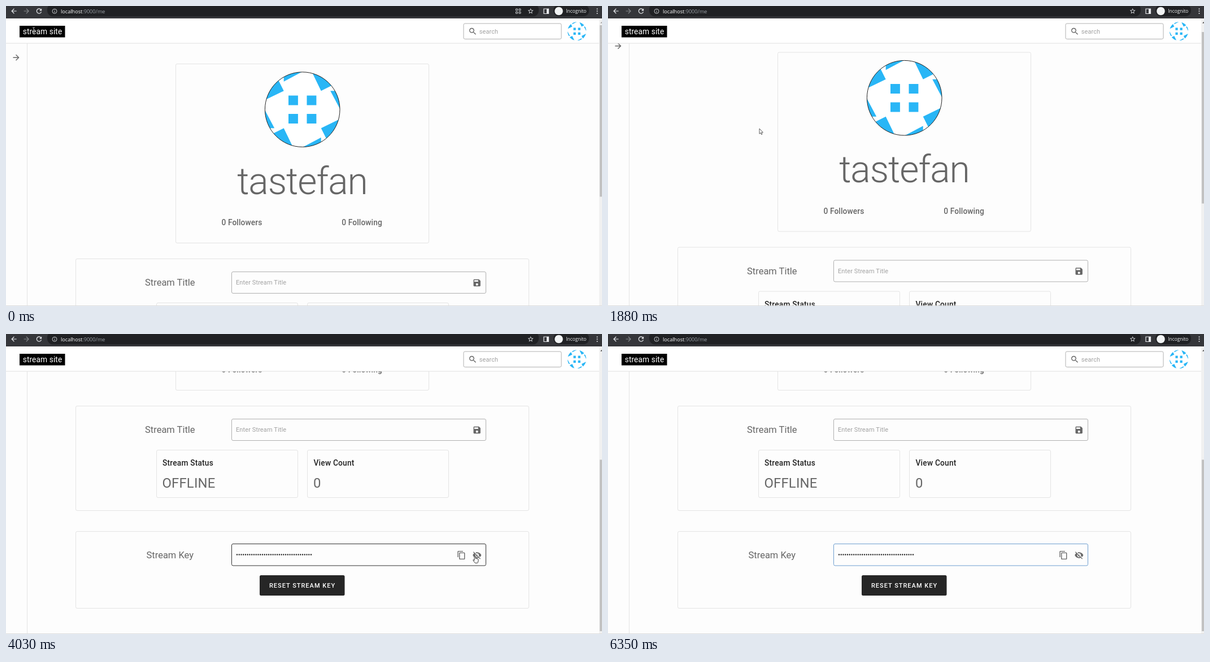
Animation of 1055x531 px, one loop 6450 ms. Source, as an HTML page:

```html
<!DOCTYPE html>
<html lang="en">
<head>
<meta charset="utf-8">
<title>Stream site profile</title>
<style>
html, body { margin: 0; width: 100%; height: 100%; overflow: hidden; background: #fdfdfd; }
svg { display: block; width: 100%; height: 100%; }
text { font-family: Roboto, sans-serif; white-space: pre; }
.ui { font-family: "Open Sans", "Noto Sans", sans-serif; }
.card { fill: none; stroke: #e4e4e4; }
.field { fill: none; stroke: #b0b0b0; }
.grey { fill: #666; }
.hint { fill: #a2a2a2; }
.dark { fill: #222; }
.h5 { font-size: 16.5px; }
.h6 { font-size: 13.74px; letter-spacing: .1px; }
.in { font-size: 11px; letter-spacing: .1px; }
.med { font-weight: 500; }
</style>
</head>
<body>
<svg id="stage" viewBox="0 0 1055 531" preserveAspectRatio="none" xmlns="http://www.w3.org/2000/svg"></svg>
<script>
const LOOP = 6450, SCROLL = 320;

const glyphs = {
  arrow: "M12 4l-1.41 1.41L16.17 11H4v2h12.17l-5.58 5.59L12 20l8-8z",
  reload: "M17.65 6.35C16.2 4.9 14.21 4 12 4c-4.42 0-7.99 3.58-7.99 8s3.57 8 7.99 8c3.73 0 6.84-2.55 7.73-6h-2.08c-.82 2.33-3.04 4-5.65 4-3.31 0-6-2.69-6-6s2.69-6 6-6c1.66 0 3.14.69 4.22 1.78L13 11h7V4z",
  close: "M19 6.4L17.6 5 12 10.6 6.4 5 5 6.4 10.6 12 5 17.6 6.4 19 12 13.4 17.6 19 19 17.6 13.4 12z",
  star: "M22 9.24l-7.19-.62L12 2 9.19 8.63 2 9.24l5.46 4.73L5.82 21 12 17.27 18.18 21l-1.63-7.03zM12 15.4l-3.76 2.27 1-4.28-3.32-2.88 4.38-.38L12 6.1l1.71 4.04 4.38.38-3.32 2.88 1 4.28z",
  search: "M15.5 14h-.79l-.28-.27C15.41 12.59 16 11.11 16 9.5 16 5.91 13.09 3 9.5 3S3 5.91 3 9.5 5.91 16 9.5 16c1.61 0 3.09-.59 4.23-1.57l.27.28v.79l5 4.99L20.49 19zm-6 0C7.01 14 5 11.99 5 9.5S7.01 5 9.5 5 14 7.01 14 9.5 11.99 14 9.5 14z",
  save: "M17 3H5c-1.11 0-2 .9-2 2v14c0 1.1.89 2 2 2h14c1.1 0 2-.9 2-2V7zm-5 16c-1.66 0-3-1.34-3-3s1.34-3 3-3 3 1.34 3 3-1.34 3-3 3zm3-10H5V5h10z",
  copy: "M16 1H4c-1.1 0-2 .9-2 2v14h2V3h12zm3 4H8c-1.1 0-2 .9-2 2v14c0 1.1.9 2 2 2h11c1.1 0 2-.9 2-2V7c0-1.1-.9-2-2-2zm0 16H8V7h11z",
  eye: "M12 4.5C7 4.5 2.73 7.61 1 12c1.73 4.39 6 7.5 11 7.5s9.27-3.11 11-7.5c-1.73-4.39-6-7.5-11-7.5zM12 17c-2.76 0-5-2.24-5-5s2.24-5 5-5 5 2.24 5 5-2.24 5-5 5zm0-8c-1.66 0-3 1.34-3 3s1.34 3 3 3 3-1.34 3-3-1.34-3-3-3z",
  eyeOff: "M12 7c2.76 0 5 2.24 5 5 0 .65-.13 1.26-.36 1.83l2.92 2.92c1.51-1.26 2.7-2.89 3.43-4.75-1.73-4.39-6-7.5-11-7.5-1.4 0-2.74.25-3.98.7l2.16 2.16C10.74 7.13 11.35 7 12 7zM2 4.27l2.74 2.74C3.08 8.3 1.78 10.02 1 12c1.73 4.39 6 7.5 11 7.5 1.55 0 3.03-.3 4.38-.84L19.73 22 21 20.73 3.27 3zM7.53 9.8l1.55 1.55c-.05.21-.08.43-.08.65 0 1.66 1.34 3 3 3 .22 0 .44-.03.65-.08l1.55 1.55c-.67.33-1.41.53-2.2.53-2.76 0-5-2.24-5-5 0-.79.2-1.53.53-2.2zm4.31-.78l3.15 3.15.02-.16c0-1.66-1.34-3-3-3z"
};

const icon = (name, x, y, fill = "#666", size = 16.5, turn = 0, id = "") =>
  `<path id="${id}" d="${glyphs[name]}" fill="${fill}" transform="translate(${x} ${y}) rotate(${turn}) scale(${size / 24}) translate(-12 -12)"/>`;
const text = (str, x, y, cls, extra = "") => `<text x="${x}" y="${y}" class="${cls}" ${extra}>${str}</text>`;
const box = (x, y, w, h, cls, extra = "") =>
  `<rect x="${x}" y="${y}" width="${w}" height="${h}" rx="2.5" class="${cls}" ${extra}/>`;
const fill = (x, y, w, h, color, extra = "") =>
  `<rect x="${x}" y="${y}" width="${w}" height="${h}" fill="${color}" ${extra}/>`;

// One quarter of the identicon, turned four times.
const quarter = "M16.5-67L33-33 67-50V-67zM-33-67H0L-33-49.5zM-24.7-24.7h16.9v16.9h-16.9z";
const avatar = (x, y, scale, ring) =>
  `<g transform="translate(${x} ${y}) scale(${scale})"><circle r="66.3" fill="#fff"/><g clip-path="url(#disc)">` +
  [0, 90, 180, 270].map(a => `<path d="${quarter}" fill="#29b6f6" transform="rotate(${a})"/>`).join("") +
  `</g><circle r="66.3" fill="none" stroke="#222" stroke-width="${ring}"/></g>`;

const tip = (id, x, w, str) =>
  `<g id="${id}"><rect x="${x}" y="354.5" width="${w}" height="22" rx="2.8" fill="#616161" fill-opacity=".9"/>` +
  text(str, x + 10.5, 369, "med", `font-size="9.6" fill="#fff" id="${id}Text"`) + "</g>";

const page = `<g id="page">
  ${icon("arrow", 18, 91.2)}
  ${box(300.5, 102.5, 448, 317, "card")}
  ${avatar(524.7, 183.2, 1, 1)}
  ${text("tastefan", 524.5, 332.5, "grey", 'text-anchor="middle" font-size="66" font-weight="300" letter-spacing="-1.03"')}
  ${text("0 Followers", 381.5, 388, "grey h6 med")}
  ${text("0 Following", 594.3, 388, "grey h6 med")}
  ${box(123.5, 447.5, 802, 185, "card")}
  ${text("Stream Title", 246, 495, "grey h5")}
  ${box(399.5, 470.5, 450, 38, "field")}
  ${text("Enter Stream Title", 407, 493, "hint in")}
  ${icon("save", 833.7, 490)}
  ${box(266.5, 525.5, 250, 84, "card")}
  ${box(533.5, 525.5, 250, 84, "card")}
  ${text("Stream Status", 277, 553.3, "dark h6 med", 'style="letter-spacing:.2px"')}
  ${text("OFFLINE", 276.5, 592, "grey", 'font-size="23.9" letter-spacing=".17"')}
  ${text("View Count", 544.5, 553.3, "dark h6 med", 'style="letter-spacing:.2px"')}
  ${text("0", 544, 592, "grey", 'font-size="23.9"')}
  ${box(123.5, 669.5, 802, 136, "card")}
  ${text("Stream Key", 248.5, 716.5, "grey h5")}
  ${box(399.5, 691.5, 450, 38.5, "field", 'id="keyBox"')}
  <path id="dots" d="M409 710.5H540.5" stroke="#222" stroke-width="2.4" stroke-linecap="round" stroke-dasharray="0 3.743"/>
  ${text("3462f1a6-5bfc-41e4-aa7f-ae0bc06a320d", 407, 714.5, "dark in", 'id="key"')}
  ${icon("copy", 806.2, 711.5)}
  ${icon("eyeOff", 833.8, 711.5, "#666", 16.5, 0, "eyeOff")}
  ${icon("eye", 833.8, 711.5, "#666", 16.5, 0, "eye")}
  ${box(449, 747, 150.5, 36, "", 'fill="#262626"')}
  ${text("RESET STREAM KEY", 466, 768.6, "med", 'font-size="11" letter-spacing="1" fill="#fff"')}
</g>`;

const header = `${fill(0, 22, 1050, 44, "#fff")}${fill(0, 65.5, 1050, 1, "#e2e2e2")}
  ${fill(24, 35, 80.5, 20.5, "#000")}
  ${text("stream site", 29.7, 49.7, "h6", 'fill="#fff"')}
  ${box(810, 31, 173, 27.5, "field")}
  ${icon("search", 826.2, 45)}
  ${text("search", 837.7, 48.6, "hint in")}
  ${avatar(1010.6, 44.7, .25, 0)}`;

const squares = [[902.5, 5], [908, 5], [902.5, 10.3], [908, 10.3]]
  .map(([x, y]) => `<rect x="${x}" y="${y}" width="3" height="3" rx=".8"/>`).join("");

const bar = `${fill(0, 0, 1055, 22, "#35363a")}
  <rect x="73" y="-4" width="870" height="22.5" rx="10" fill="#202124"/>
  <rect x="969" y="-2" width="63" height="20" rx="9" fill="#202124"/>
  <circle id="hover" cx="58.3" cy="9" r="6.3" fill="#fff" fill-opacity=".1"/>
  ${icon("arrow", 14, 9, "#e8eaed", 14, 180)}
  ${icon("arrow", 36.3, 9, "#85878a", 14)}
  ${icon("reload", 58.5, 9, "#e8eaed", 14, 0, "reload")}
  ${icon("close", 58.5, 9, "#e8eaed", 13.5, 0, "close")}
  <g fill="none" stroke="#c4c7ca"><circle cx="86" cy="9.2" r="4"/><path d="M86 8.8v2.6M86 6.7v1"/></g>
  <text class="ui" x="97" y="12.6" font-size="9.15" fill="#fff">localhost<tspan fill="#9aa0a6">:9000/me</tspan></text>
  <g id="share" fill="none" stroke="#c4c7ca" stroke-width="1.1">${squares}</g>
  ${icon("star", 928.7, 9, "#dadce0", 12)}
  <path d="M952 5h8.5v8.5H952z" fill="none" stroke="#e8eaed" stroke-width="1.2"/><path d="M957 5h3.5v8.5H957z" fill="#e8eaed"/>
  <circle cx="978.5" cy="9" r="7.3" fill="#f1f3f4"/>
  ${text("Incognito", 991.3, 12, "ui", 'font-size="8.3" fill="#f1f3f4"')}
  <path d="M1046.5 5.2v9" stroke="#e8eaed" stroke-width="2" stroke-linecap="round" stroke-dasharray="0 3.9"/>`;

document.getElementById("stage").innerHTML = `
  <clipPath id="disc"><circle r="66.3"/></clipPath>
  ${fill(0, 0, 1055, 531, "#fdfdfd")}
  ${page}
  ${fill(37, 66, 1, 465, "#e4e4e4")}
  ${header}
  ${fill(1050, 22, 5, 509, "#f1f1f1")}
  <path id="up" d="M1052 30.5l2.2-2.6 2.2 2.6z"/>
  ${fill(1051, 34, 4, 303.5, "#c1c1c1", 'id="thumb"')}
  ${fill(0, 530, 1055, 1, "#dcdcdc")}
  ${bar}
  <g id="status"><path d="M0 523H350q2 0 2 2V531H0z" fill="#202124"/>
  ${text("Connecting...", 2, 532.5, "ui", 'font-size="8.6" fill="#dadce0"')}</g>
  ${tip("copyTip", 759, 95, "Copy Stream Key")}
  ${tip("eyeTip", 785.5, 97, "Show Stream Key")}
  <path id="pointer" d="M0 0V9.3L2.1 7.4 3.5 10.5 5 9.9 3.6 6.8H6.4z" fill="#fff" stroke="#333" stroke-width=".8"/>
  <path id="beam" d="M-2-4.5h1.5l.5.6.5-.6H2M0-4V4M-2 4.5h1.5l.5-.6.5.6H2" fill="none" stroke="#ccc" stroke-width=".9" style="mix-blend-mode:difference"/>
  <path id="hand" d="M-1 1a1 1 0 0 1 2 0v3.6l4 .9q1.3.4 1.1 1.7l-.6 3.2q-.3 1.6-1 2.3H.3q-1.6-1.7-3.4-4.6q-.6-1.2.5-1.4L-1 8.1z" fill="#fff" stroke="#222" stroke-width=".9"/>`;

const el = {};
document.querySelectorAll("[id]").forEach(e => { if (e.id) el[e.id] = e; });

const path = [
  [0, 49, 42.5], [50, 49, 42.5], [130, 53, 27], [250, 58, 6.5], [500, 58, 6.5],
  [620, 90, 62], [740, 168, 165], [830, 222, 213], [880, 239, 222], [1020, 249, 224],
  [1110, 249, 224], [1500, 265, 219], [1730, 268, 217], [1900, 268, 217],
  [2120, 470, 290], [2300, 760, 430], [2400, 827, 452], [2450, 827, 452],
  [2590, 825, 407], [2690, 833, 393], [2790, 832, 392], [2940, 813, 392],
  [3070, 811, 393], [3750, 811, 393], [3960, 829, 393], [4150, 832, 392],
  [5470, 832, 392], [5570, 855, 424], [5750, 980, 535]
];
const shapes = [[0, "beam"], [110, "pointer"], [2560, "beam"], [2650, "hand"], [2850, "beam"],
  [2890, "hand"], [3820, "beam"], [3880, "hand"], [5540, "pointer"], [5750, ""]];

const clamp = v => Math.min(1, Math.max(0, v));
const ease = v => v * v * (3 - 2 * v);
const ramp = (t, a, b) => ease(clamp((t - a) / (b - a)));
const show = (e, on) => e.setAttribute("visibility", on ? "visible" : "hidden");

function place(t) {
  const i = path.findIndex(p => p[0] > t);
  if (i < 0) return path[path.length - 1].slice(1);
  const [a, b] = [path[i - 1], path[i]], k = (t - a[0]) / (b[0] - a[0]);
  return [a[1] + (b[1] - a[1]) * k, a[2] + (b[2] - a[2]) * k];
}

function grow(e, k, cx) {
  const s = .75 + .25 * k;
  e.setAttribute("opacity", k);
  e.setAttribute("transform", `translate(${cx} 376.5) scale(${s}) translate(${-cx} -376.5)`);
}

function border(t) {
  if (t >= 6350) return ["#6f9fd0", 1];
  if (t >= 4250) return ["#1f5fae", 1.4];
  if (t >= 2620) return ["#333", 1];
  return ["#b0b0b0", 1];
}

function render(t) {
  const s = ramp(t, 1790, 2380);
  el.page.setAttribute("transform", `translate(0 ${-SCROLL * s})`);
  el.thumb.setAttribute("y", 34 + 188.5 * s);
  el.up.setAttribute("fill", s > 0 ? "#505050" : "#a3a3a3");

  const loading = t >= 490 && t < 1250;
  show(el.close, loading);
  show(el.reload, !loading);
  show(el.share, t < 490);
  show(el.hover, t >= 190 && t < 540);
  show(el.status, t >= 700 && t < 1300);

  const open = t >= 4400 && t < 5070;
  show(el.key, open);
  show(el.eye, open);
  show(el.dots, !open);
  show(el.eyeOff, !open);
  const [color, width] = border(t);
  el.keyBox.style.stroke = color;
  el.keyBox.style.strokeWidth = width;

  grow(el.copyTip, ramp(t, 3090, 3250) - ramp(t, 3830, 3980), 806.5);
  grow(el.eyeTip, .8 * (ramp(t, 2720, 2850) - ramp(t, 2880, 3020)) +
    ramp(t, 4030, 4200) - ramp(t, 5540, 5700), 834);
  el.eyeTipText.textContent = (open ? "Hide" : "Show") + " Stream Key";
  el.eyeTip.firstChild.setAttribute("width", open ? 93 : 97);

  const [x, y] = place(t), kind = shapes.filter(k => k[0] <= t).pop()[1];
  for (const name of ["pointer", "beam", "hand"]) {
    show(el[name], name === kind);
    el[name].setAttribute("transform", `translate(${x} ${y})`);
  }
}

const start = performance.now();
function tick() {
  render((performance.now() - start) % LOOP);
  requestAnimationFrame(tick);
}
tick();
</script>
</body>
</html>
```
